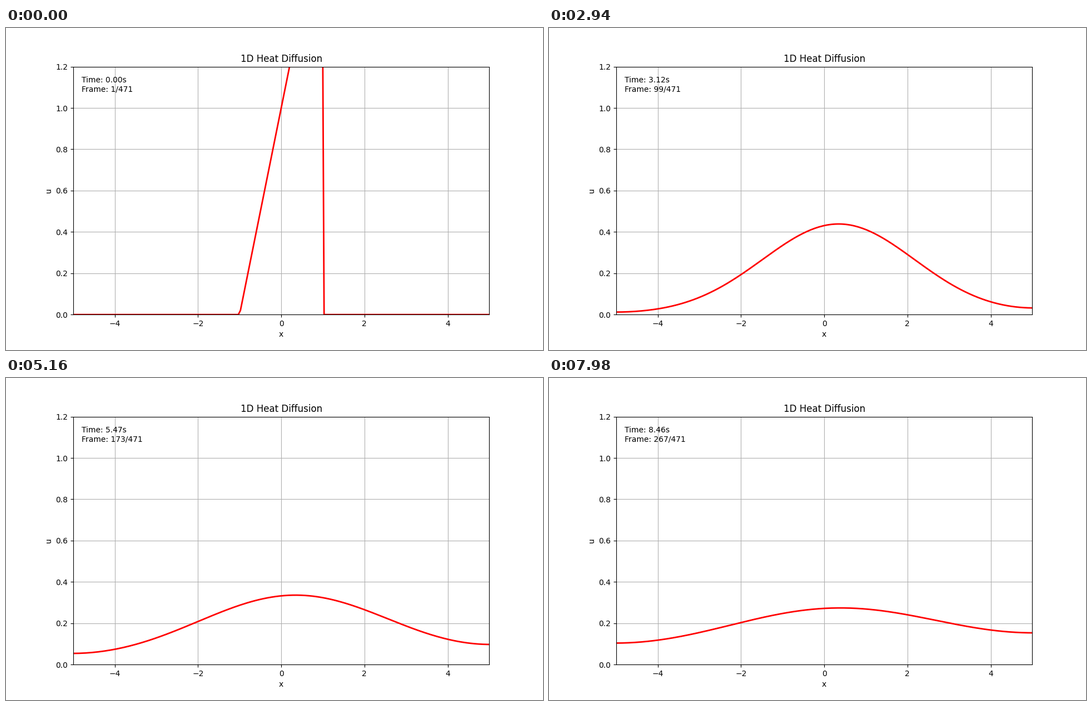
A matplotlib script for the animation above (8 s loop, 966 by 580 pixels).

```python
import matplotlib.pyplot as plt
import numpy as np
from matplotlib.animation import FuncAnimation

LOOP_MS = 8000
SHOWN = 267      # frames in one loop
TOTAL = 471      # length of the full run, used by the counter
STEPS = 14       # solver steps per frame
D = 0.5          # diffusivity

x = np.linspace(-5, 5, 200)
dx = x[1] - x[0]
dt = 0.45 * dx**2 / D


def step(u):
    """One explicit heat step with insulated ends."""
    p = np.pad(u, 1, mode="edge")
    return u + D * dt / dx**2 * (p[2:] - 2 * u + p[:-2])


def solve():
    u = np.where(np.abs(x) <= 1, 1 + x, 0.0)
    states = [u]
    for _ in range(SHOWN - 1):
        for _ in range(STEPS):
            u = step(u)
        states.append(u)
    return states


states = solve()

fig, ax = plt.subplots(figsize=(9.66, 5.8), dpi=100)
line, = ax.plot(x, states[0], color="red", lw=2)
label = ax.text(0.02, 0.9, "", transform=ax.transAxes)
ax.set(xlim=(-5, 5), ylim=(0, 1.2), xlabel="x", ylabel="u",
       title="1D Heat Diffusion")
ax.grid(True)


def update(i):
    line.set_ydata(states[i])
    label.set_text(f"Time: {i * STEPS * dt:.2f}s\nFrame: {i + 1}/{TOTAL}")
    return line, label


anim = FuncAnimation(fig, update, frames=SHOWN, interval=LOOP_MS / SHOWN,
                     init_func=lambda: update(0), repeat=True)
plt.show()
```
